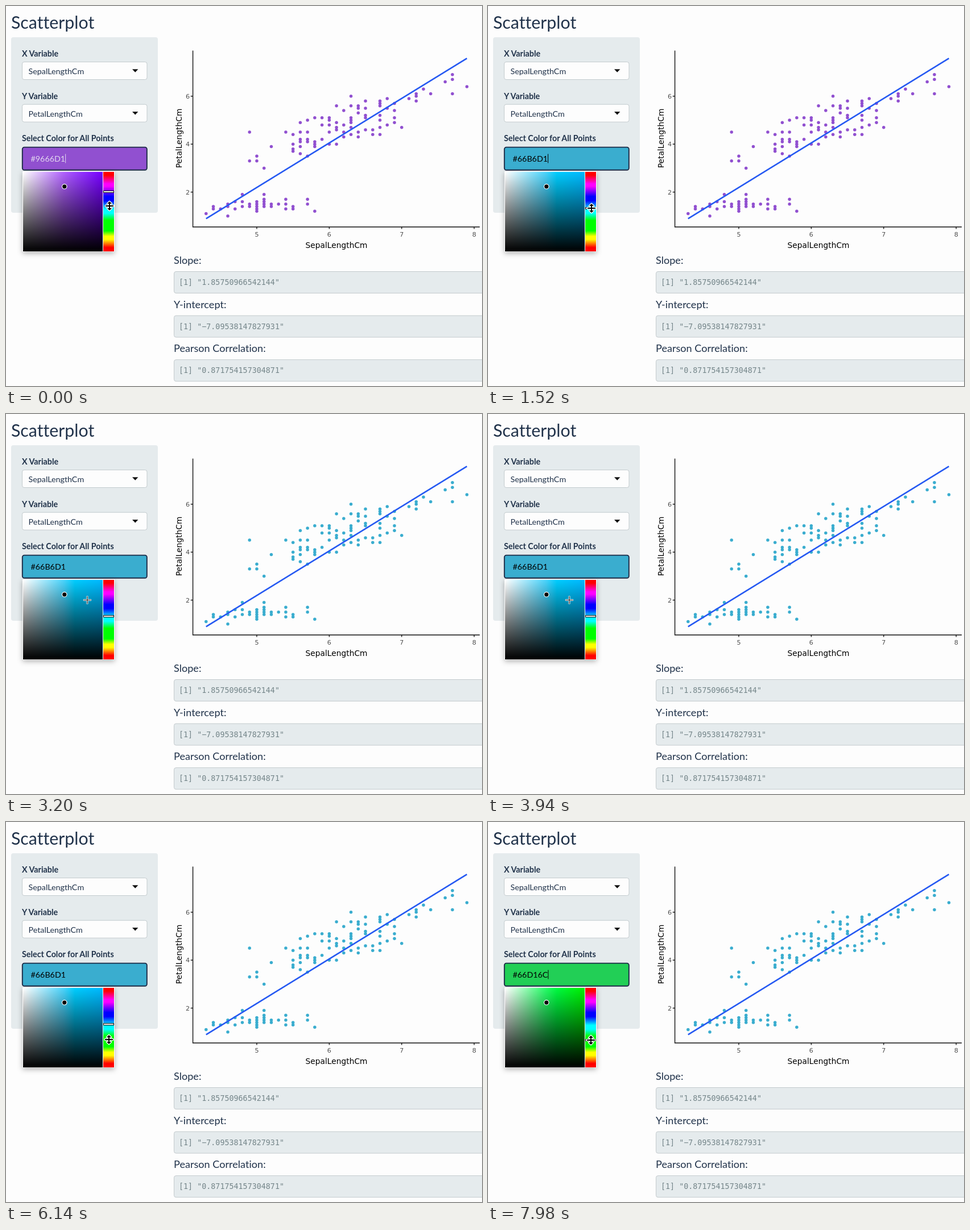
An HTML page for the animation above (8000 ms loop, 837 px wide and 669 px high).

```html
<!DOCTYPE html>
<html lang="en">
<head>
<meta charset="utf-8">
<title>Scatterplot</title>
<style>
  html, body { margin: 0; width: 100%; height: 100%; overflow: hidden; background: #fdfdfd; }
  svg { display: block; font-family: Lato, sans-serif; font-size: 14.3px; fill: #20324a; font-variant-ligatures: none; }
  .title { font-size: 30.3px; }
  .label { font-weight: 700; }
  .heading { font-size: 18.1px; }
  .well { fill: #e5ebed; }
  .select { fill: #fdfdfd; stroke: #c3cbce; }
  .pre { fill: #e5ebed; stroke: #c3cacd; }
  .output { font: 13.37px "DejaVu Sans Mono", monospace; fill: #75868a; }
  .axis { stroke: #111; stroke-width: 1.4; fill: none; }
  .tick { font: 11.2px "DejaVu Sans", sans-serif; fill: #4d4d4d; }
  .axis-title { font: 13.8px "DejaVu Sans", sans-serif; fill: #000; text-anchor: middle; }
  .picker { filter: drop-shadow(0 3px 5px rgba(0, 0, 0, .3)); fill: #fff; }
</style>
</head>
<body>
<svg width="837" height="669" viewBox="0 0 837 669">
  <defs>
    <linearGradient id="saturation">
      <stop offset="0" stop-color="#fff"/>
      <stop class="shade" offset=".51"/>
      <stop class="shade" offset=".65"/>
      <stop class="shade" offset="1"/>
    </linearGradient>
    <linearGradient id="value" x2="0" y2="1">
      <stop offset="0" stop-opacity="0"/>
      <stop offset="1"/>
    </linearGradient>
    <linearGradient id="hue" x2="0" y2="1"></linearGradient>
  </defs>

  <text class="title" x="9" y="39.5">Scatterplot</text>
  <rect class="well" x="9" y="55" width="258" height="309" rx="4"/>
  <g id="form"></g>
  <rect id="field" x="28.8" y="248.6" width="219" height="40.2" rx="3.5" stroke="#1d2b47" stroke-width="1.9"/>
  <text id="hex" x="43.5" y="273.5"></text>
  <path id="caret" d="M0 260.5V276.5"/>

  <g id="plot"></g>
  <g id="results"></g>

  <rect class="picker" x="29" y="291" width="162" height="141.5"/>
  <rect x="30" y="292" width="140" height="140" fill="url(#saturation)"/>
  <rect x="30" y="292" width="140" height="140" fill="url(#value)"/>
  <circle cx="102.8" cy="317.8" r="4.2" fill="#000" stroke="#fff" stroke-width="1.2"/>
  <rect x="171" y="292" width="19" height="140" fill="url(#hue)"/>
  <rect id="marker" x="171.5" y="-1.5" width="18" height="3" fill="#fff" stroke="#000"/>

  <path id="resize" stroke="#fff" stroke-width="2.6" stroke-linejoin="round" paint-order="stroke" fill="#000"
    d="M0-8L4-4H1V-1H7V1H1V4H4L0 8L-4 4H-1V1H-7V-1H-1V-4H-4Z"/>
  <g id="cross">
    <path d="M-7 0H7M0-7V7" stroke="#fff" stroke-width="3"/>
    <path d="M-6.5 0H6.5M0-6.5V6.5" stroke="#222" stroke-width="1.2"/>
  </g>
</svg>
<script>
const LOOP = 8000;
const $ = id => document.getElementById(id);
const add = (id, markup) => $(id).insertAdjacentHTML('beforeend', markup);

// Form
['X Variable', 'Y Variable', 'Select Color for All Points'].forEach((label, i) => {
  const y = 88.8 + i * 74.7;
  add('form', `<text class="label" x="28" y="${y}">${label}</text>`);
  if (i < 2) add('form', `
    <rect class="select" x="28.5" y="${y + 9.7}" width="219.5" height="31" rx="3.5"/>
    <text x="39.5" y="${y + 31}">${i ? 'Petal' : 'Sepal'}LengthCm</text>
    <path d="M222 ${y + 22.5}h10.4l-5.2 5.4z" fill="#111"/>`);
});

// Results
[['Slope:', '1.85750966542144'],
 ['Y-intercept:', '−7.09538147827931'],
 ['Pearson Correlation:', '0.871754157304871']].forEach(([heading, value], i) => {
  const y = 454 + i * 77.6;
  add('results', `
    <text class="heading" x="295" y="${y}">${heading}</text>
    <rect class="pre" x="295.5" y="${y + 13.5}" width="560" height="38" rx="3.5"/>
    <text class="output" x="304" y="${y + 37}">[1] "${value}"</text>`);
});

// Plot: petal lengths in mm for each sepal length from 4.3 cm in 0.1 cm steps
const petalLengths = `11|13-14|13|10 14-15|13 16|14 16 19|14-15 33 45|12-16 33 35|14-17 19 30|14-15 39|15|
13 15 17 45|13-14 37-38 40 44|36 39 41-42 45 49|15 17 35 41-42 45 50|12 39-41 51|42 48 51|40 45 48 50-51|
40 46-47 49 56|43 45 48 54|44 47 49-51 56 60|43 45 53 55-56|46 51-52 55 58|44 46|44 47 50 52 56-58|
48 55 59|49 51 54 57|47|59|58 60-61|63|61||66|61 67 69||64`.split('|');
const px = x => 441 + (x - 5) * 127.4;
const py = y => 327.6 - (y - 2) * 42.2;
const fit = x => 1.85750966542144 * x - 7.09538147827931;

let dots = '';
petalLengths.forEach((column, i) => {
  for (const range of column.trim().split(' ').filter(Boolean)) {
    const [from, to = from] = range.split('-').map(Number);
    for (let mm = from; mm <= to; mm++)
      dots += `<circle cx="${px(4.3 + i / 10)}" cy="${py(mm / 10)}" r="2.75"/>`;
  }
});
add('plot', `<g id="dots">${dots}</g>
  <path d="M${px(4.3)} ${py(fit(4.3))}L${px(7.9)} ${py(fit(7.9))}" stroke="#2458f2" stroke-width="2.6"/>
  <path class="axis" d="M328.6 78.5V389H833"/>
  <text class="axis-title" x="581" y="426">SepalLengthCm</text>
  <text class="axis-title" transform="translate(309 233) rotate(-90)">PetalLengthCm</text>`);
for (const x of [5, 6, 7, 8]) add('plot', `<path class="axis" d="M${px(x)} 389v3.5"/>
  <text class="tick" x="${px(x)}" y="406" text-anchor="middle">${x}</text>`);
for (const y of [2, 4, 6]) add('plot', `<path class="axis" d="M328.6 ${py(y)}h-3.8"/>
  <text class="tick" x="323" y="${py(y) + 4}" text-anchor="end">${y}</text>`);

// Hue strip: each pure colour holds for a short band
[['#f00', 0, .04], ['#f0f', .15, .18], ['#00f', .31, .36], ['#0ff', .47, .52],
 ['#0f0', .61, .74], ['#ff0', .81, .85], ['#f00', .95, 1]].forEach(([color, ...offsets]) => {
  for (const offset of offsets) $('hue').innerHTML += `<stop offset="${offset}" stop-color="${color}"/>`;
});

// Animation
const picks = [
  { at: 0, hex: '#9666D1', color: '#9150d0', ink: '#e2d8ee', y: 327, shades: ['#b162fe', '#9d45ff', '#7600ff'] },
  { at: 1420, hex: '#66B6D1', color: '#3aadcf', ink: '#000', y: 356, shades: ['#4ad4fc', '#00cdff', '#00b8ff'] },
  { at: 6700, hex: '#66D16C', color: '#22cf56', ink: '#000', y: 384, shades: ['#28fd68', '#00fb40', '#00f000'] },
];
const REPLOT = 2880;
const path = [
  [0, 182, 352], [700, 182, 352], [1400, 182, 356], [1700, 182, 356], [2540, 159, 331.5],
  [3200, 143, 327.5], [4050, 143, 327.5], [4880, 173, 368.5], [5600, 181, 383],
  [6300, 181, 383], [6650, 181, 384], [LOOP, 181, 384],
];

function pointerAt(t) {
  const i = path.findIndex(stop => stop[0] > t);
  const [t0, x0, y0] = path[i - 1], [t1, x1, y1] = path[i];
  const k = (t - t0) / (t1 - t0), ease = k * k * (3 - 2 * k);
  return [x0 + (x1 - x0) * ease, y0 + (y1 - y0) * ease];
}

let current;
function showPick(pick) {
  if (pick === current) return;
  current = pick;
  $('field').setAttribute('fill', pick.color);
  $('hex').textContent = pick.hex;
  $('hex').setAttribute('fill', pick.ink);
  $('caret').setAttribute('stroke', pick.ink);
  $('marker').setAttribute('transform', `translate(0 ${pick.y})`);
  document.querySelectorAll('.shade').forEach((stop, i) => stop.setAttribute('stop-color', pick.shades[i]));
}

function draw(now) {
  const t = now % LOOP;
  const pick = picks.findLast(p => p.at <= t);
  showPick(pick);
  $('caret').setAttribute('transform', `translate(${44 + $('hex').getComputedTextLength()} 0)`);
  $('caret').style.opacity = (t - pick.at) % 1000 < 500 ? 1 : 0;
  $('dots').setAttribute('fill', picks[t < REPLOT ? 0 : 1].color);

  const [x, y] = pointerAt(t);
  const overHue = x > 170.5;
  for (const id of ['resize', 'cross']) $(id).setAttribute('transform', `translate(${x} ${y})`);
  $('resize').style.display = overHue ? '' : 'none';
  $('cross').style.display = overHue ? 'none' : '';
  requestAnimationFrame(() => draw(performance.now() - start));
}
const start = performance.now();
draw(0);
</script>
</body>
</html>
```
